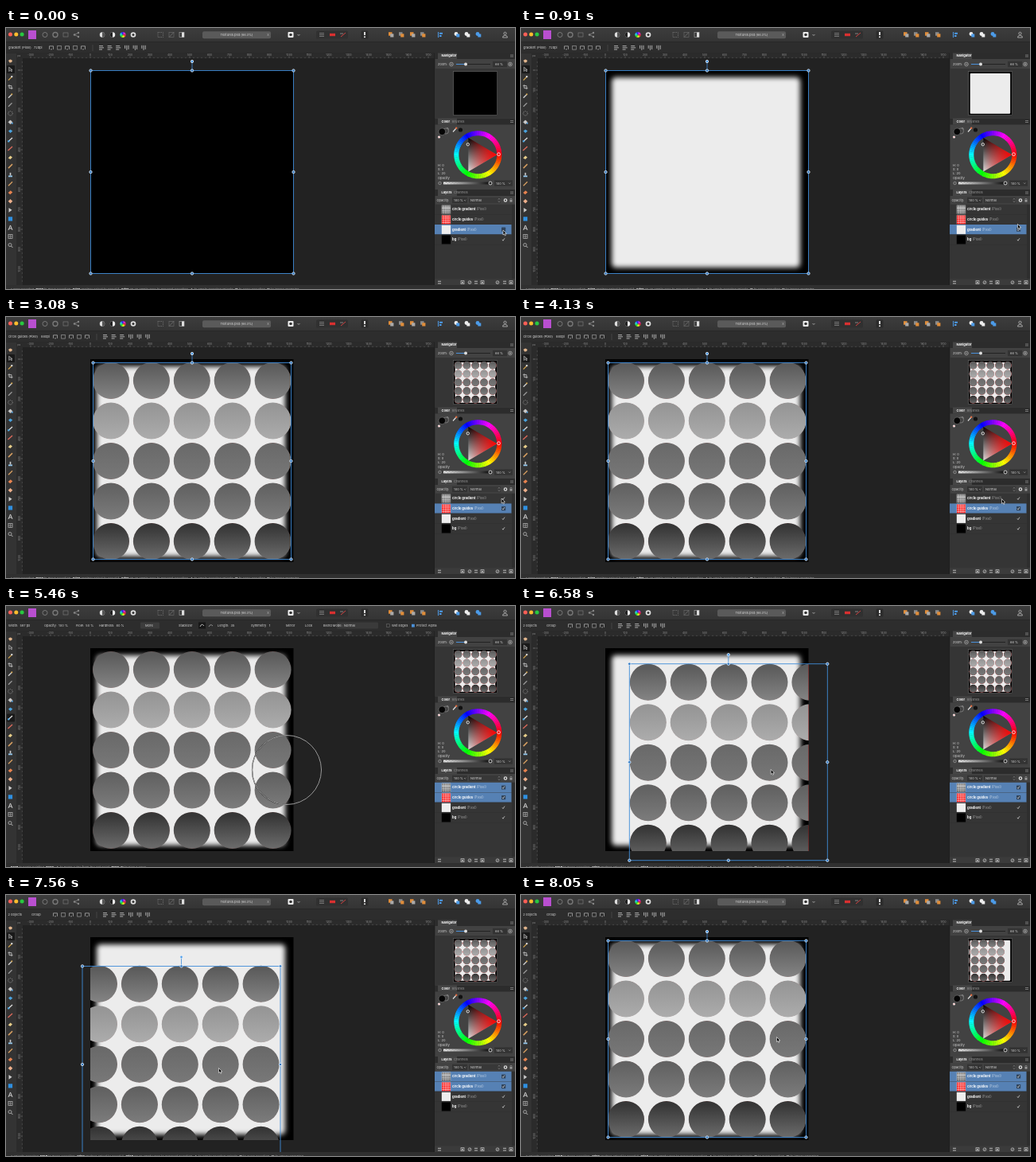
Recreate the animation shown at these times as an HTML page. Size 640 px wide and 328 px high, loop 8.12 s.

```html
<!DOCTYPE html>
<html lang="en">
<head>
<meta charset="utf-8">
<title>Layered textures in a photo editor</title>
<style>
html, body { margin: 0; width: 100%; height: 100%; overflow: hidden; background: #222; }
svg { display: block; width: 100vw; height: 100vh; }
text { font: 4px Inter, "Liberation Sans", sans-serif; fill: #d6d6d6; white-space: pre; }
.b { font-weight: 700; fill: #fff; }
.dim { fill: #999; }
.rule { font-size: 3.2px; fill: #999; }
</style>
</head>
<body>
<svg id="stage" viewBox="0 0 640 328"></svg>
<script>
const LOOP = 8120, STEP = 70;
const DOC = { x: 106, y: 53, w: 255.5, h: 255 };
const WIDE = { x: 106.5, y: 53.5, w: 255, h: 255 };
const TIGHT = { x: 109.5, y: 57.5, w: 249, h: 247 };

// Markup helpers
const rect = (x, y, w, h, fill, more = '') =>
  `<rect x="${x}" y="${y}" width="${w}" height="${h}" fill="${fill}" ${more}/>`;
const dot = (x, y, r, fill, more = '') =>
  `<circle cx="${x}" cy="${y}" r="${r}" fill="${fill}" ${more}/>`;
const ring = (x, y, r, color, w = .8) => dot(x, y, r, 'none', `stroke="${color}" stroke-width="${w}"`);
const path = (d, color = '#aaa', w = .8, fill = 'none') =>
  `<path d="${d}" stroke="${color}" stroke-width="${w}" fill="${fill}"/>`;
const text = (x, y, s, cls = '', more = '') => `<text x="${x}" y="${y}" class="${cls}" ${more}>${s}</text>`;
const group = (id, body, more = '') => `<g id="${id}" ${more}>${body}</g>`;
const times = (n, fn) => Array.from({ length: n }, (_, i) => fn(i)).join('');
const frame = (x, y, w, h, color = '#aaa', sw = .7) => rect(x, y, w, h, 'none', `stroke="${color}" stroke-width="${sw}"`);

// Five by five circles
const circles = (r, fill) => times(25, i =>
  dot(132 + i % 5 * 50.9, 80 + Math.floor(i / 5) * 50.5, r, fill(Math.floor(i / 5))));
const shades = [['#5c5c5c', '#848484'], ['#969696', '#acacac'], ['#6a6a6a', '#787878'],
  ['#626262', '#7c7c7c'], ['#373737', '#6c6c6c']];

const defs = `<defs>
  ${shades.map(([a, b], i) => `<linearGradient id="shade${i}" x2="0" y2="1">
    <stop offset=".1" stop-color="${a}"/><stop offset="1" stop-color="${b}"/></linearGradient>`).join('')}
  <linearGradient id="grey" x2="0" y2="1"><stop stop-color="#000"/><stop offset="1" stop-color="#ddd"/></linearGradient>
  <linearGradient id="hue"><stop stop-color="#f00" stop-opacity="0"/><stop offset="1" stop-color="#f00"/></linearGradient>
  <linearGradient id="alpha"><stop stop-color="#eee"/><stop offset="1" stop-color="#111"/></linearGradient>
  <linearGradient id="title" x2="0" y2="1"><stop stop-color="#3d3d3d"/><stop offset="1" stop-color="#343434"/></linearGradient>
  <filter id="soft" x="-10%" y="-10%" width="120%" height="120%"><feGaussianBlur stdDeviation="3.2"/></filter>
  <clipPath id="doc">${rect(DOC.x, DOC.y, DOC.w, DOC.h, '#000')}</clipPath>
  <clipPath id="view">${rect(21, 38, 519, 285, '#000')}</clipPath>
  <g id="paper">${rect(114, 62, 237, 239, '#ececec', 'rx="5" filter="url(#soft)"')}</g>
  <g id="reds">${circles(22.4, () => '#fe0000')}</g>
  <g id="greys">${circles(23, row => `url(#shade${row})`)}</g>
</defs>`;

// The picture, used for the canvas and the navigator
const artwork = p => rect(DOC.x, DOC.y, DOC.w, DOC.h, '#000') +
  `<g clip-path="url(#doc)"><use id="${p}Paper" href="#paper"/>` +
  group(p + 'Move', `<use id="${p}Reds" href="#reds"/><use id="${p}Greys" href="#greys"/>`) + '</g>';
const small = (x, y, size, body) =>
  `<g transform="translate(${x} ${y}) scale(${size / 255}) translate(-106 -53)">${body}</g>`;

function selection(id, { x, y, w, h }) {
  const cx = x + w / 2;
  const points = [cx, y - 11.5];
  for (const v of [0, .5, 1]) for (const u of [0, .5, 1])
    if (u !== .5 || v !== .5) points.push(x + u * w, y + v * h);
  let s = frame(x, y, w, h, '#3f8cd8', .9) + path(`M${cx} ${y - 11}V${y}`, '#3f8cd8');
  for (let i = 0; i < points.length; i += 2)
    s += dot(points[i], points[i + 1], 1.7, i ? '#2d75c0' : '#4a9be8', 'stroke="#e8f1fb" stroke-width=".8"');
  return group(id, s);
}

function titleBar() {
  let s = rect(0, 0, 640, 18, 'url(#title)') + rect(0, 17.5, 640, .6, '#1d1d1d');
  ['#ff5f57', '#febc2e', '#28c840'].forEach((c, i) => s += dot(5.5 + i * 7.3, 8, 2.5, c));
  s += rect(28, 3, 10, 11, '#b94fd0');
  s += ring(49, 8.5, 3, '#777', 1) + ring(62, 8.5, 3, '#777', 1.4) + frame(72, 6, 6, 5, '#777') +
    path('M86 8.5L91 6M86 8.5L91 11', '#888') + dot(86, 8.5, 1.2, '#888') + dot(91, 6, 1.2, '#888') + dot(91, 11, 1.2, '#888');
  s += dot(121, 8.5, 3.2, '#ddd') + path('M121 5.3A3.2 3.2 0 0 1 121 11.7Z', 'none', 0, '#555');
  s += dot(134, 8.5, 3.2, '#eee') + path('M134 5.3A3.2 3.2 0 0 0 134 11.7Z', 'none', 0, '#222');
  s += times(12, i => path(arc(147, 8.5, 2, i * 30, i * 30 + 32), `hsl(${i * 30} 90% 55%)`, 3.2));
  s += dot(160, 8.5, 3.3, '#ddd') + dot(160, 8.5, 1.5, '#333');
  s += rect(191, 5.5, 6.5, 6, 'none', 'stroke="#888" stroke-width=".7" stroke-dasharray="1"') +
    frame(205, 5.5, 6, 6, '#666') + path('M205 11.5L211 5.5', '#777') + frame(218, 5.5, 6, 6, '#999') + rect(221, 5.5, 3, 6, '#ddd');
  s += rect(247, 4.2, 86, 9, '#5a5a5a', 'rx="2"') + text(290, 10.2, 'Textures.psd (66.3%)', '', 'text-anchor="middle"') +
    path('M328.5 7L330.5 10M330.5 7L328.5 10', '#aaa', .5);
  s += rect(354.5, 5, 7, 7, '#eee', 'rx="1"') + dot(358, 8.5, 1.8, '#333') + path('M366.5 8L368 9.5L369.5 8', '#bbb');
  s += rect(390, 3.5, 40, 10, '#303030', 'rx="1.5"') + times(3, i => path(`M394 ${6.5 + i * 2}H400`, '#888')) +
    rect(407, 6.8, 7, 3.4, '#d93030') + path('M421 11L427 6', '#d04040', 1) + path('M420 7H424', '#999');
  s += rect(446.5, 3.5, 9, 10, '#2c2c2c', 'rx="1.5"') + path('M451 5V9', '#eee', 1.8) + dot(451, 11.3, 1, '#eee');
  s += [484, 497, 511, 524].map((x, i) =>
    rect(x - 3, 5.2, 4.5, 4.5, i % 2 ? '#8b8b8b' : '#e08d3a') + rect(x - .8, 7.3, 4.2, 4.2, i % 2 ? '#e08d3a' : '#aaa')).join('');
  s += path('M543.5 5V12', '#4c9be8', 1) + rect(545, 5.8, 4, 2, '#4c9be8') + rect(545, 9, 2.6, 2, '#4c9be8');
  s += [567, 580, 594].map((x, i) =>
    dot(x - 1, 7.5, 2.4, i === 2 ? '#4c9be8' : '#eee') + rect(x - .7, 7.5, 4, 4, i === 1 ? '#eee' : '#4c9be8')).join('');
  return s + ring(627.5, 6.8, 1.6, '#ccc', .7) + path('M624.5 12Q624.5 9.3 627.5 9.3T630.5 12Z', '#ccc', .7);
}

function arc(cx, cy, r, a, b) {
  const at = d => `${cx + r * Math.cos(d * Math.PI / 180)} ${cy + r * Math.sin(d * Math.PI / 180)}`;
  return `M${at(a)}A${r} ${r} 0 0 1 ${at(b)}`;
}

// Arrange and align buttons of the move tool
function alignIcons(x) {
  const rows = k => path('M-3 -2.2H2M-3 0H3M-3 2.2H1', '#bbb', .9).replace('<path', `<path transform="rotate(${k * 90})"`);
  return times(5, i => `<g transform="translate(${x + i * 10} 24.8)">${i % 2 ? frame(-2.3, -2.3, 4.6, 4.6, '#999') : path('M-2.5 2V-2H2.5V2M-1 2H1', '#aaa')}</g>`) +
    path(`M${x + 52} 21V29`, '#555', .6) +
    times(6, i => `<g transform="translate(${x + 63 + i * 10.6} 24.8)">${rows(i < 3 ? 0 : 1)}</g>`);
}

function contextBars() {
  const field = (x, s) => text(x, 26.3, s);
  const brush = [[3, 'Width:  597 px'], [48, 'Opacity:  100 %'], [88, 'Flow:  50 %'], [117, 'Hardness:  80 %'],
    [175, 'More'], [217, 'Stabilizer'], [266, 'Length:  35'], [308, 'Symmetry   1'], [352, 'Mirror'],
    [376, 'Lock'], [399, 'Blend Mode:  Normal'], [485, 'Wet Edges'], [516, 'Protect Alpha']];
  return rect(0, 18, 640, 13.5, '#2d2d2d') +
    group('barGradient', field(3, 'gradient (Pixel)') + field(35, '72dpi') + alignIcons(57)) +
    group('barGuides', field(3, 'circle guides (Pixel)') + field(44, '88dpi') + alignIcons(62)) +
    group('barBoth', field(2.5, '2 objects') + field(32, 'Group') + alignIcons(62)) +
    group('barBrush', rect(169, 20.5, 24, 8, '#3c3c3c', 'rx="1"') + rect(242, 20.5, 9, 8, '#171717') +
      path('M244 26Q246 21 249 25', '#ddd') + path('M255 26Q257 22 260 25', '#aaa') +
      rect(416, 20.5, 52, 8, '#3a3a3a', 'rx="1"') + frame(478.5, 22.8, 3.8, 3.8, '#777', .5) + rect(510, 22.8, 3.8, 3.8, '#4a90d9') +
      brush.map(([x, s]) => field(x, s)).join(''));
}

function rulers() {
  let s = rect(13, 31.5, 527, 6.5, '#2b2b2b') + rect(13, 31.5, 8, 291.5, '#2b2b2b');
  for (let v = -300; v <= 1700; v += 20) {
    const x = 106 + v * .25, tall = v % 100 === 0;
    s += path(`M${x} 38V${tall ? 35.5 : 36.8}`, '#999', .4);
    if (tall) s += text(x, 35.2, v, 'rule', 'text-anchor="middle"');
  }
  for (let v = -40; v <= 1060; v += 20) {
    const y = 53 + v * .25, tall = v % 100 === 0;
    s += path(`M21 ${y}H${tall ? 18.5 : 19.8}`, '#999', .4);
    if (tall) s += text(0, 0, v, 'rule', `text-anchor="middle" transform="translate(18 ${y}) rotate(-90)"`);
  }
  return s + text(14.5, 36, 'px', 'rule');
}

function toolIcons() {
  const shapes = [
    path('M-2.5 0Q0 -3 2.5 0Q2 3 -1 2.5Z', 'none', 0, '#e0b48c'),
    path('M-1.8 -3V2.5L0 1L1.5 3L2 2L1 .5H2.5Z', '#ddd', .5, '#444'),
    path('M-2.5 2.5L2 -2', '#d9a94f', 1.2) + dot(1.8, -2, 1.2, '#ddd'),
    path('M-1.5 -3V1.5H3M-3 -1.5H1.5V3', '#ccc'),
    path('M-2.5 2.5L1.5 -1.5', '#ccc', 1.4) + dot(1.8, -2, 1, '#d9a94f'),
    path('M-2.5 2.5L2 -2', '#999', 1.2),
    dot(0, 0, 2.7, 'none', 'stroke="#bbb" stroke-width=".7" stroke-dasharray="1"'),
    path('M-2.5 0L0 -2.5L2.5 0L0 2.5Z', '#ddd', .5, '#ccc') + dot(2.3, 1.5, 1, '#58a9e8'),
    path('M-2.5 0L0 -2L2.8 0L0 2.5Z', 'none', 0, '#4aa3df'),
    path('M-3 2.5L2.5 -2.5', '#ddd', 1.3) + dot(-2.2, 1.8, 1.2, '#4aa3df'),
    path('M-3 2.5L2.5 -2.5', '#e06b5c', 1.3),
    path('M-2.8 1L0 -2L2.5 0L0 2.5Z', 'none', 0, '#e8cf8a'),
    path('M-2.5 2.5L2.5 -2.5', '#d8a062', 1.5),
    rect(-2.5, .8, 5, 1.8, '#8fc4ea') + rect(-.8, -2.8, 1.6, 3.6, '#ccc'),
    path('M-2.5 2.5L2.5 -2.5', '#d8a062', 1.3),
    path('M-2.8 .3L.3 -2.5L2.8 -.3L-.3 2.5Z', 'none', 0, '#e8834f'),
    path('M-2.8 0L0 -2.8L2.8 0L0 2.8Z', 'none', 0, '#eeb08c'),
    path('M-2 -2.8L2 0L-2 2.8Z', 'none', 0, '#ccc'),
    rect(-2.6, -2.6, 5.2, 5.2, '#2f8fe0'),
    path('M-2.5 3L0 -3L2.5 3M-1.5 1H1.5', '#ddd', .9),
    frame(-2.5, -2.5, 5, 5, '#bbb') + path('M-2.5 0H2.5M0 -2.5V2.5', '#bbb', .5),
    ring(-.5, -.5, 2, '#bbb') + path('M1 1L3 3', '#bbb', 1)];
  return rect(0, 31.5, 13, 292, '#333') +
    rect(1, 0, 10, 10, '#191919', 'id="tool" rx="1"') +
    shapes.map((s, i) => `<g transform="translate(5.5 ${41 + i * 11.05})">${s}</g>`).join('');
}

function panels() {
  const bar = (y, a, b = '', x = 0) => rect(539, y, 101, 8, '#2c2c2c') + rect(543, y, 24, 8, '#454545') +
    text(547.5, y + 5.2, a, 'b') + text(x, y + 5.2, b, 'dim') + path(`M634 ${y + 3}H638M634 ${y + 5}H638`, '#aaa', .6);
  let s = rect(539, 31.5, 101, 292, '#424242') + rect(538.5, 31.5, .8, 292, '#1a1a1a');

  s += bar(31, 'Navigator') + text(543, 47, 'Zoom:') + ring(560, 45.5, 2.3, '#ccc', .6) + path('M558.8 45.5H561.2', '#ccc', .6) +
    path('M566 45.5H609', '#222', 1) + path('M566 45.5H578', '#4a90d9', 1) + dot(578, 45.5, 2, '#ddd') +
    rect(612, 41.8, 18, 7.4, '#333') + text(615, 47, '66 %') +
    ring(634, 45.5, 2.3, '#ccc', .6) + path('M632.8 45.5H635.2M634 44.3V46.7', '#ccc', .6);
  s += rect(539.5, 51, 100.5, 62, '#353535') + small(563, 55, 54.3, artwork('nav')) + frame(562.7, 54.7, 55, 55, '#666', .5);

  s += bar(113.5, 'Color', 'Brushes', 561);
  s += ring(553, 129.5, 3.6, '#999', .6) + dot(548.3, 130.3, 4.3, '#050505', 'stroke="#777" stroke-width=".6"') +
    path('M554 125.5Q556.5 125 556.5 127.5', '#aaa', .6) + dot(544.5, 137, 1.5, '#fff') + path('M543.5 138L545.5 136', '#e33', .5) +
    path('M562 130.5L566 126', '#ddd', 1.2) + dot(566.2, 125.8, 1.2, '#e06b3f') + dot(571.5, 128, 2.6, '#111');
  s += times(72, i => path(arc(593.3, 159.2, 27, i * 5 - 2.5, i * 5 + 3), `hsl(${i * 5} 100% 50%)`, 6));
  s += ['grey', 'hue'].map(id => path('M581.3 138L617.3 159.2L581.3 180.5Z', 'none', 0, `url(#${id})`)).join('') +
    ring(619.5, 158.7, 1.9, '#fff') + ring(580.8, 146.3, 1.7, '#fff');
  s += ['H: 0', 'S: 0', 'L: 20'].map((v, i) => text(543, 174 + i * 5, v)).join('');
  s += text(543, 190.3, 'Opacity') + ring(545.5, 195, 1.7, '#bbb', .6) + rect(550, 193.5, 58, 3, 'url(#alpha)') +
    times(14, i => rect(551 + i * 2, i % 2 ? 193.5 : 195, 1, 1.5, '#777', `opacity="${.6 - i * .04}"`)) +
    dot(609, 195, 2, '#222', 'stroke="#eee" stroke-width=".8"') +
    rect(614, 191.3, 23, 7.4, '#333') + text(616, 196.5, '100 %') + path('M632 194.5L633.2 195.7L634.4 194.5', '#bbb', .6);

  s += bar(203, 'Layers', 'Channels', 563) + text(541.5, 218, 'Opacity:') +
    rect(561, 212.8, 19, 7.4, '#333') + text(563, 218, '100 %') + path('M576 216L577.2 217.2L578.4 216', '#bbb', .6) +
    rect(582, 212.8, 40, 7.4, '#383838') + text(584, 218, 'Normal') + path('M619 215.5L620 214.3L621 215.5M619 217.5L620 218.7L621 217.5', '#bbb', .5) +
    ring(628, 216.5, 1.7, '#ddd', 1.2) + rect(633.5, 216, 3, 2.6, '#999') + path('M634 216V214.5H636V216', '#999', .6);
  s += rect(539, 221.7, 97, 94, '#353535') + rect(636, 221.7, 4, 94, '#2e2e2e');
  ['circle gradient', 'circle guides', 'gradient', 'bg'].forEach((name, i) => {
    const y = 221.8 + i * 12.6;
    s += rect(539, y, 96.5, 12.4, '#5681b4', `id="row${i}"`) + rect(539, y + 12.3, 96.5, .4, '#2c2c2c') +
      rect(547.8, y + .9, 11.3, 11, ['#e4e4e4', '#f8ecec', '#eee', '#000'][i]) +
      (i < 2 ? small(547.8, y + .9, 11.3, `<use href="#${i ? 'reds' : 'greys'}"/>`) : '') +
      `<text x="561" y="${y + 7.6}" style="font-size:4.2px"><tspan class="b">${name}</tspan><tspan id="kind${i}" fill="#999"> (Pixel)</tspan></text>` +
      rect(623, y + 3.6, 5.2, 5.2, '#26303d', `id="box${i}" opacity=".75" rx=".6"`) +
      path(`M624 ${y + 6.3}L625 ${y + 7.7}L627 ${y + 4.6}`, '#ddd', .7).replace('<path', `<path id="check${i}"`);
  });
  s += rect(539, 315.5, 101, 8, '#3b3b3b');
  s += [545, 574, 583, 591, 599, 618, 627, 635].map((x, i) =>
    i % 3 === 1 ? frame(x - 2, 317.7, 4, 4, '#ccc') + dot(x, 319.7, 1, '#ccc')
    : i % 3 === 2 ? ring(x, 319.7, 1.9, '#bbb') + path(`M${x - 1.3} 321L${x + 1.3} 318.4`, '#bbb', .7)
    : path(`M${x - 2} 318.3H${x + 2}M${x - 2} 321H${x + 2}`, '#bbb', 1)).join('');
  return s;
}

function statusBar() {
  const line = (id, parts) => `<text id="${id}" x="6" y="330" class="dim">` + parts.map((p, i) =>
    i % 2 ? `<tspan class="b">${p}</tspan>` : p).join('') + '</text>';
  const rest = [' to move selection. ', 'Click', ' another object to select it. ', 'Click', ' on an empty area to deselect selection. ',
    '⇧', ' to add to selected objects. ', '⌘', ' to cycle selection. ', '⌥', ' to ignore snapping.'];
  return rect(0, 323, 640, 5, '#303030') + line('tipOne', ['1 layer selected. ', 'Drag', ...rest]) +
    line('tipBoth', ['2 objects selected. ', 'Drag', ...rest]) +
    line('tipBrush', ['', 'Drag', ' to begin painting. ', 'Drag+⇧', ' to brush a line from the last point. ', 'Drag+⌥', ' to pick a color.']);
}

document.getElementById('stage').innerHTML = defs + rect(0, 0, 640, 328, '#222') +
  `<g clip-path="url(#view)">${artwork('art')}${selection('wide', WIDE)}${selection('tight', TIGHT)}</g>` +
  rulers() + toolIcons() + panels() + titleBar() + contextBars() + statusBar() +
  group('brush', ring(0, 0, 43.5, '#111', 1.2) + ring(0, 0, 43.5, '#ddd', .7)) +
  group('arrow', path('M0 0V6L1.4 4.8L2.4 7L3.4 6.5L2.5 4.4H4.3Z', '#fff', .6, '#000'));

// Motion: [time, x, y]
const pointer = [[0, 625, 254], [560, 625, 254], [1200, 624, 240], [1890, 624, 240], [2170, 624.5, 228],
  [3000, 624.5, 228], [4130, 604.5, 228.5], [4500, 600, 229], [5040, 500, 215], [5460, 353, 206],
  [5950, 300, 195], [6300, 287, 190], [7000, 355, 228.5], [7560, 267.5, 217.5], [7770, 243, 186], [8050, 321.5, 178.5]];
const drag = [[6300, 0, 0], [7000, 69.5, 39.5], [7560, -15, 31.8], [7770, -41, 0], [7910, 0, 0]];
const BOX_LAG = 10;

function along(keys, t) {
  const i = keys.findIndex(k => k[0] > t);
  if (i <= 0) return keys[i < 0 ? keys.length - 1 : 0].slice(1);
  const [a, b] = [keys[i - 1], keys[i]];
  const u = (t - a[0]) / (b[0] - a[0]);
  return [a[1] + (b[1] - a[1]) * u, a[2] + (b[2] - a[2]) * u];
}

const el = Object.fromEntries([...document.querySelectorAll('[id]')].map(n => [n.id, n]));
const show = (id, on) => el[id].setAttribute('display', on ? 'inline' : 'none');
const move = (id, [x, y]) => el[id].setAttribute('transform', `translate(${x} ${y})`);

function draw(t) {
  const both = t >= 4340, guides = t >= 1540 && !both;
  const painting = t >= 5040 && t < 5950;
  const on = [t >= 2240, t >= 1540, t >= 420, true];
  const chosen = [both, both || guides, t < 1540, false];

  ['Greys', 'Reds', 'Paper'].forEach((layer, i) => {
    show('art' + layer, on[i]);
    show('nav' + layer, t >= [2660, 1960, 770][i]);
  });
  move('artMove', along(drag, t));
  move('navMove', t >= 7840 ? along(drag, 7770) : [0, 0]);

  show('wide', t < 1540);
  show('tight', t >= 1540 && !painting);
  move('tight', along(drag, t - BOX_LAG));

  for (let i = 0; i < 4; i++) {
    show('row' + i, chosen[i]);
    show('box' + i, chosen[i]);
    show('check' + i, on[i]);
    el['kind' + i].style.fill = chosen[i] ? '#b9cbe0' : '#999';
  }
  show('barGradient', t < 1540);
  show('barGuides', guides);
  show('barBoth', both && !painting);
  show('barBrush', painting);
  show('tipOne', !both);
  show('tipBoth', both && !painting);
  show('tipBrush', painting);
  el.tool.setAttribute('y', painting ? 135.5 : 47);

  const tip = along(pointer, t);
  show('brush', painting);
  show('arrow', !painting);
  move('brush', tip);
  move('arrow', tip);
}

const start = performance.now();
function tick() {
  const t = (performance.now() - start) % LOOP;
  draw(Math.floor(t / STEP) * STEP);
  requestAnimationFrame(tick);
}
tick();
</script>
</body>
</html>
```
